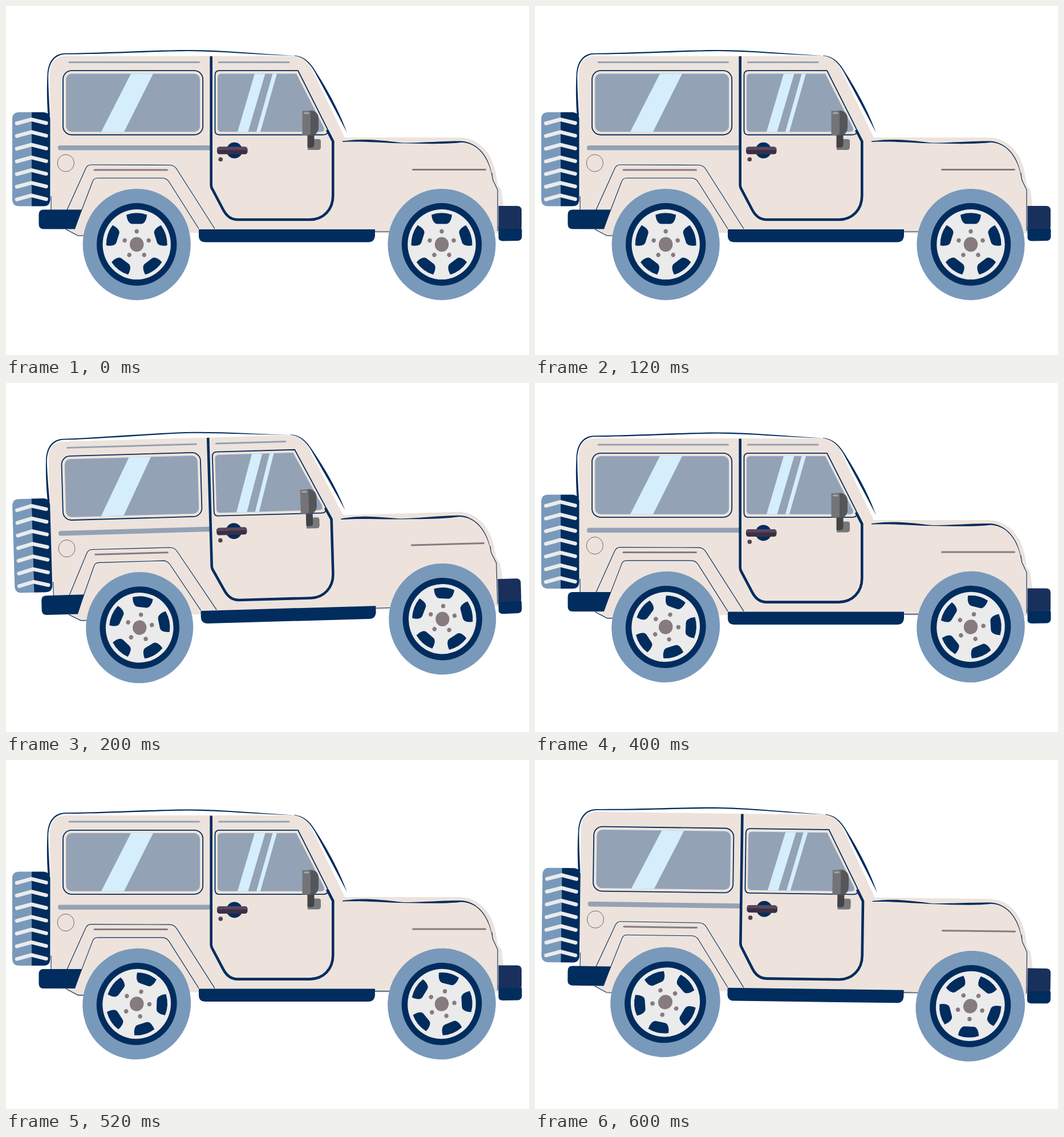
These frames come from a looping animation (917 px wide and 611 px high, 800 ms). An HTML page:

```html
<!DOCTYPE html>
<html lang="en">
<head>
<meta charset="utf-8">
<title>Bouncing off-roader</title>
<style>
html, body { margin: 0; width: 100%; height: 100%; overflow: hidden; background: #fff; }
svg { display: block; width: 100%; height: 100%; }
.navy { fill: #002d5e; }
.blue { fill: #7999bb; }
.glass { fill: #94a2b5; }
.glare { fill: #d5eefb; }
.brown { fill: #867b80; }
.line { fill: none; stroke: #002d5e; }
.trim { fill: none; stroke-linecap: round; stroke-width: 3; }
</style>
</head>
<body>
<svg viewBox="0 0 917 611">
  <defs>
    <g id="wheel">
      <ellipse class="blue" rx="94.6" ry="97.5"/>
      <ellipse class="navy" rx="70.2" ry="72.3"/>
      <ellipse fill="#ebebec" rx="59.7" ry="61.4"/>
      <g id="rim" transform="scale(.97 1)"></g>
      <ellipse class="brown" rx="12.2" ry="12.8"/>
    </g>
  </defs>
  <g id="car">
    <!-- shell -->
    <path fill="#ede3dc" d="M77 118C77 97 88 87.500 106 87.500H500C518 87.500 526 92 535 108L594 230.300H795C826 230.300 852 254 859 294L862 313L868.500 322L872.500 352V398H650V397H300V404H128L105 391H79Z"/>
    <path class="navy" d="M77 192C75.500 165 74 140 74.200 122C75 100 85 85 105 84.500C180 84.500 260 79.300 320 79C380 79.500 440 85.500 505 87C440 83.500 380 77 320 77C260 77 180 82 104 82.700C83 83 73 99 72.500 122C71.500 140 71.500 165 73.500 192Z"/>
    <path class="navy" d="M505 86.500C520 87.500 531 95 542 113C560 141 583 180 598 222C580 187 560 150 541 115C531 98 520 88.500 505 87.200Z"/>
    <path class="navy" d="M590 236.500C610 234 625 233.500 640 234.200C665 235.500 680 238 697 239.500C740 239 765 236.300 798 236.500C828 238 850 266 853 304C848 268 829 240 799 238.800C770 242.500 730 241 690 240.300C655 239.500 625 236.500 590 238Z"/>
    <path class="line" stroke-width="1.100" d="M852 292L853.500 304L862 322V394M646 395H672M105 391L126 402H137M79 333V357"/>

    <!-- spare wheel -->
    <path class="blue" d="M45 186H23Q11 186 11 198V338Q11 350.500 23 350.500H45Z"/>
    <path class="navy" d="M45 186H66Q77.500 187 77.500 198V338Q77.500 350.500 66 350.500H45Z"/>
    <g id="treads" class="trim" stroke="#ebebec" style="stroke-width:6.5"></g>

    <!-- fenders and trim -->
    <path class="line" stroke-width="1.100" d="M107 357L140 284Q143 278 149 278L287 278.500Q295 279 299 285L366 390M120 390L152 307Q154 301.300 161 301.300H275Q282 302 286 308L338 390"/>
    <path class="trim" stroke="#867b80" d="M155 287H282.500M713.500 286.500H840.500"/>
    <path id="roofTrim" class="trim" stroke="#94a2b5" d="M111 98.500H338.500M373.500 98.500H496"/>
    <path class="glass" d="M95 244H360V252.500H95Q91 252.500 91 248.200T95 244Z"/>
    <ellipse cx="104.800" cy="275" rx="14.600" ry="15" fill="none" stroke="#5c5a60" stroke-width=".9"/>

    <!-- windows -->
    <rect class="line" stroke-width="1.800" x="100" y="113.200" width="245.200" height="112.300" rx="15"/>
    <rect class="glass" x="105.300" y="118.500" width="234.700" height="101.700" rx="10"/>
    <path class="glare" d="M219 118.500H258L207 220.200H167Z"/>
    <path class="line" stroke-width="1.800" d="M366.500 121Q366.500 113.200 374 113.200H512L563 214Q567 225.500 556 225.500H374Q366.500 225.500 366.500 218Z"/>
    <path class="glass" d="M371 125Q371 118.500 377.500 118.500H509L557 212Q560 220.200 552 220.200H377.500Q371 220.200 371 213.500Z"/>
    <path class="glare" d="M436 118.500H454.500L424.500 220.200H406ZM467.500 118.500H475L446 220.200H439Z"/>

    <!-- door -->
    <path class="line" stroke-width="4.600" d="M359.700 88V314Q360 318 362 321L381 357Q390 374 406 374H533C556 374 573.300 357 573.300 332V237L563 217"/>
    <circle class="navy" cx="400.500" cy="252.800" r="14"/>
    <rect x="370" y="246.500" width="53.500" height="13" rx="4.500" fill="#3d2f43"/>
    <path fill="#574860" d="M374 246.500H419Q423.500 247 423.500 252H370Q370 247 374 246.500Z"/>
    <circle cx="376.300" cy="268.500" r="3.800" fill="#534252"/>

    <!-- mirror -->
    <path fill="#77787a" d="M529 233H548Q552 233 552 237V247Q552 252 547 252H529Z"/>
    <path fill="#434448" d="M528.500 222H540.500V243Q540 248 535 248H528.500Z"/>
    <path fill="#55565a" d="M530 183H537Q548 186 548 197V214Q547 226 533 227H528Z"/>
    <path fill="#737477" d="M519.500 183.500H534V224L529 226H519.500Z"/>
    <rect x="522" y="186" width="9.500" height="3" rx="1.500" fill="#a5a6a8"/>

    <!-- bumpers and sill -->
    <path class="navy" d="M66 356.500H133L121 390.500H66Q57.500 390.500 57.500 382V365Q57.500 356.500 66 356.500Z"/>
    <path class="navy" d="M863.500 386H902Q905 390 904.500 395V404Q904 410 898 411L871 411.500Q864 411 863.500 406Z"/>
    <path fill="#1a305c" d="M863.500 350H896Q904 350 904 358V386Q904 390 898 390H863.500Z"/>
    <path class="navy" d="M338 391H647V402Q646 413.500 635 413.500H350Q338 413.500 338 402Z"/>

    <use id="rear" href="#wheel"/>
    <use id="front" href="#wheel"/>
  </g>
</svg>
<script>
const el = id => document.getElementById(id);
const STEP = 200;

// Each pose: body matrix, wheel turns in degrees, roof trim shown
const poses = [
  { body: [1, 0, 0, 1, 0, 0], rear: 0, front: 0, trim: true },
  { body: [.993, -.0282, .029, .998, -5.5, 18.2], rear: 8, front: 5, trim: true },
  { body: [1, 0, 0, 1, 0, 9.6], rear: 20, front: 14, trim: true },
  { body: [1, .0131, -.0135, 1.005, 4.9, 1.4], rear: 48, front: 38, trim: false }
];

function buildRim() {
  let parts = "";
  for (let a = 0; a < 360; a += 72) {
    parts += `<g transform="rotate(${a})">
      <path class="navy" d="M-18.5 -52Q0 -58.5 18.5 -52C18 -46 16 -41 13 -38Q11 -36 8 -36H-8Q-11 -36 -13 -38C-16 -41 -18 -46 -18.5 -52Z"/>
      <circle class="brown" cy="-22.8" r="3.8"/></g>`;
  }
  el("rim").innerHTML = parts;
}

function buildTreads() {
  let parts = "";
  for (let i = 0; i < 7; i++) {
    const y = 198.5 + i * 22.2;
    parts += `<path d="M19 ${y + 7}L44.5 ${y}L70.5 ${y + 6.5}"/>`;
  }
  el("treads").innerHTML = parts;
}

function draw(time) {
  const pose = poses[Math.floor(time / STEP) % poses.length];
  el("car").setAttribute("transform", `matrix(${pose.body})`);
  el("rear").setAttribute("transform", `translate(229.2 417.4) rotate(${pose.rear})`);
  el("front").setAttribute("transform", `translate(764 417.4) rotate(${pose.front})`);
  el("roofTrim").setAttribute("visibility", pose.trim ? "visible" : "hidden");
}

function tick() {
  draw(performance.now());
  requestAnimationFrame(tick);
}

buildRim();
buildTreads();
tick();
</script>
</body>
</html>
```
